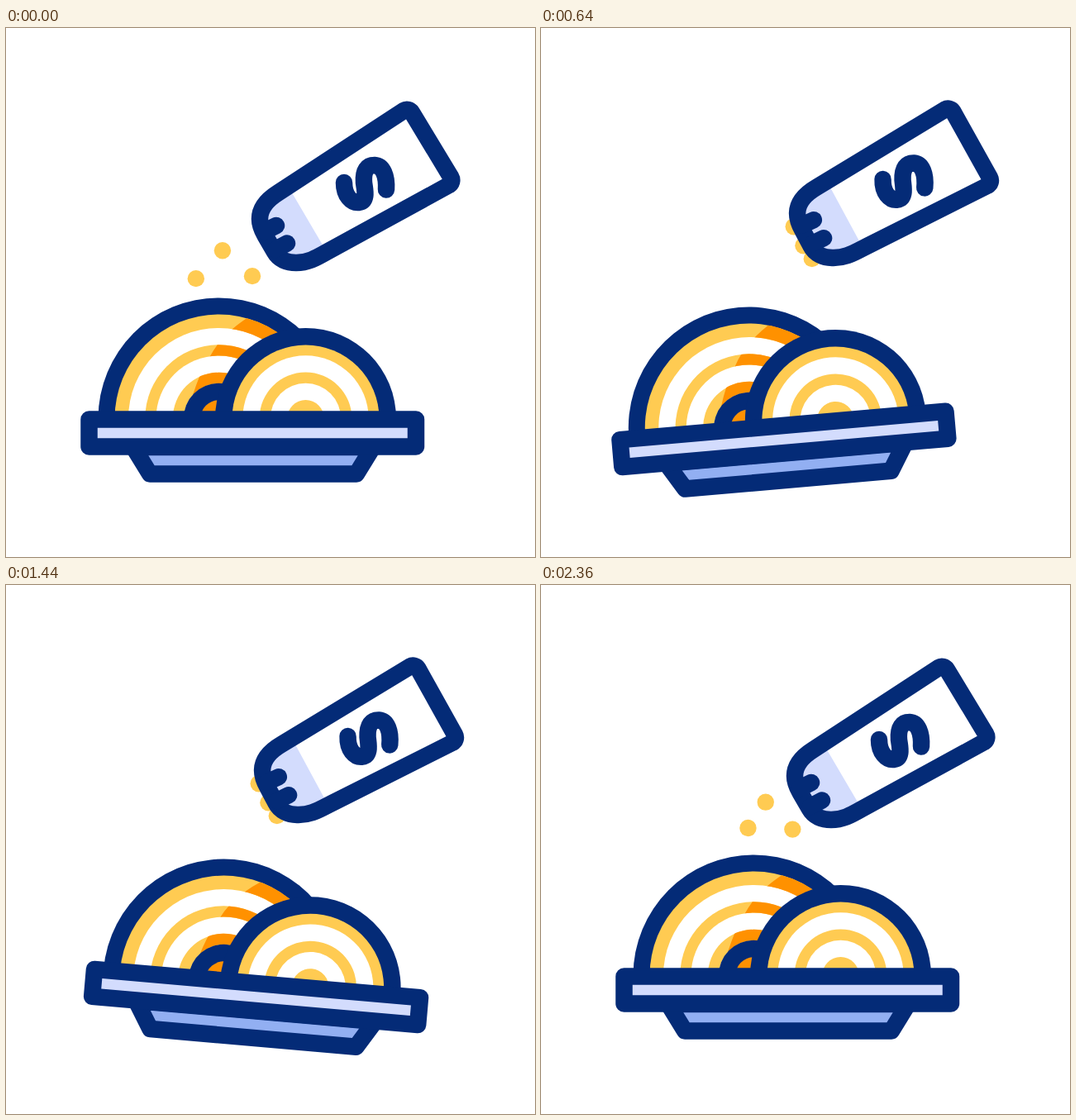
These frames come from a looping animation (640 px wide and 640 px high, 2400 ms). An HTML page:

```html
<!DOCTYPE html>
<html lang="en">
<head>
<meta charset="utf-8">
<title>Seasoning a dish</title>
<style>
  html, body { margin: 0; width: 100%; height: 100%; overflow: hidden; background: #fff; }
  svg { display: block; width: 100vw; height: 100vh; }
  .line { stroke: #042b77; stroke-width: 20.5; stroke-linecap: round; stroke-linejoin: round; }
</style>
</head>
<body>
<svg viewBox="0 0 640 640">
  <defs>
    <clipPath id="above"><rect x="80" y="300" width="440" height="174"/></clipPath>
    <clipPath id="shade"><path d="M301 345Q262 368 247 397Q227 429 219 474H420V330Z"/></clipPath>
  </defs>
  <g id="grains" fill="#ffcb52"></g>
  <g id="shaker">
    <path fill="#fff" d="M487 100L538 185L388 271L341.5 191.7Z"/>
    <path fill="#d3dcfd" d="M341.5 191.7L329 199.5C314 209 307 219 307 231C307 239 311 247 314 252L325 271C330 280 340 284 351 284C365 284 374 279 388 271Z"/>
    <g class="line" fill="none">
      <path d="M481.4 99.8A7 7 0 0 1 490.9 102L538.4 180.6A7 7 0 0 1 535.9 190.1L388 271C374 279 365 284 351 284C340 284 330 280 325 271L314 252C311 247 307 239 307 231C307 219 314 209 329 199.5Z"/>
      <path d="M313 246L327 239M326 268L340 260.5"/>
      <path d="M409 187C409 203 418 212 427 211C438 209 434 195 433 187C432 172 437 166 446 166C456 166.5 461 179 460 195.5"/>
    </g>
  </g>
  <g id="dish">
    <g id="domes" clip-path="url(#above)"></g>
    <path class="line" fill="#92aff2" d="M154 507L174 539.5H424L444 507Z"/>
    <rect class="line" fill="#d3dcfd" x="100.5" y="473.5" width="395.5" height="33"/>
  </g>
</svg>
<script>
const LOOP = 2400, BEAT = 800;
const NAVY = '#042b77', YELLOW = '#ffcb52', ORANGE = '#ff9100', WHITE = '#fff';
const el = id => document.getElementById(id);
const mix = (a, b, u) => a + (b - a) * u;
const ease = u => (1 - Math.cos(Math.PI * u)) / 2;
const bump = (t, peak, half) => ease(Math.max(0, 1 - Math.abs(t - peak) / half));

function add(parent, tag, attrs) {
  const node = document.createElementNS('http://www.w3.org/2000/svg', tag);
  for (const k in attrs) node.setAttribute(k, attrs[k]);
  return parent.appendChild(node);
}

// Half an onion: a navy rim, then noodle bands at an even pitch
const BAND = 13.2, GAP = 20.3;
const domes = el('domes');
const disc = (cx, r, fill) => add(domes, 'circle', { cx, cy: 472.5, r, fill });

function dome(cx, rim, skin, hollow) {
  disc(cx, rim, NAVY);
  disc(cx, skin, YELLOW);
  for (let r = hollow; r > GAP; r -= BAND + GAP) {
    disc(cx, r, WHITE);
    disc(cx, r - GAP, YELLOW);
  }
}

function shadow(cx, skin, hollow) {
  const g = add(domes, 'g', { 'clip-path': 'url(#shade)', fill: 'none', stroke: ORANGE });
  for (let outer = skin, r = hollow; r > 40; outer = r - GAP, r -= BAND + GAP)
    add(g, 'circle', { cx, cy: 472.5, r: (outer + r) / 2, 'stroke-width': outer - r });
}

dome(257.5, 146, 126, 109.5);
shadow(257.5, 126, 109.5);
disc(257.5, 42.7, NAVY);
disc(257.5, 22.2, ORANGE);
dome(362.5, 109.5, 89, 76.2);

// Shaker poses: angle and the place of the label centre
const REST = [0, 434.5, 189], DOWN = [2, 439, 186], UP = [14.1, 476, 156];

function drawShaker(t) {
  const low = t > 400 && t < 2000 ? DOWN : REST;
  const lift = bump(t % BEAT, 400, 240);
  const [angle, x, y] = low.map((v, i) => mix(v, UP[i], lift));
  el('shaker').setAttribute('transform',
    `translate(${x} ${y}) rotate(${angle}) translate(${-REST[1]} ${-REST[2]})`);
}

// The dish sinks once while it tips left, then right
const TILT = [[0, 0], [320, 0], [805, -6.7], [1330, 5.8], [1780, 0], [LOOP, 0]];

function drawDish(t) {
  const i = TILT.findIndex(key => key[0] > t);
  const [t0, a] = TILT[i - 1], [t1, b] = TILT[i];
  const tilt = mix(a, b, ease((t - t0) / (t1 - t0)));
  el('dish').setAttribute('transform',
    `translate(0 ${18.4 * bump(t, 1055, 728)}) rotate(${tilt} 298.5 540)`);
}

// Grains: hole, middle of the flight, landing place
const GRAINS = [
  [[302, 243], [262, 269], [256, 335]],
  [[314, 266], [230, 303], [216, 340]],
  [[324, 282], [298, 300], [299, 340]]
];
const FIRST = 640, FLIGHT = 320;
const dots = GRAINS.map(() => add(el('grains'), 'circle', { r: 10.2 }));

function drawGrains(t) {
  const since = (t - FIRST + LOOP) % LOOP;
  const burst = Math.floor(since / BEAT), u = since % BEAT / FLIGHT;
  el('grains').style.display = u <= 1 ? '' : 'none';
  const [hx, hy] = burst < 2 ? [4, -3] : [0, 0];
  const [lx, ly] = burst ? [0, 0] : [-6, 21];
  const v = Math.max(0, u * 2 - 1), out = Math.min(1, u * 2);
  GRAINS.forEach(([hole, mid, end], i) => {
    const x = mix(hole[0] + hx, mid[0], out) + (end[0] + lx - mid[0]) * v * (2 - v);
    const y = mix(hole[1] + hy, mid[1], out) + (end[1] + ly - mid[1]) * v * (0.6 + 0.4 * v);
    dots[i].setAttribute('cx', x);
    dots[i].setAttribute('cy', y);
  });
}

function draw(t) {
  drawShaker(t);
  drawDish(t);
  drawGrains(t);
}

const begin = performance.now();
function tick(now) {
  draw(Math.max(0, now - begin) % LOOP);
  requestAnimationFrame(tick);
}
draw(0);
requestAnimationFrame(tick);
</script>
</body>
</html>
```
